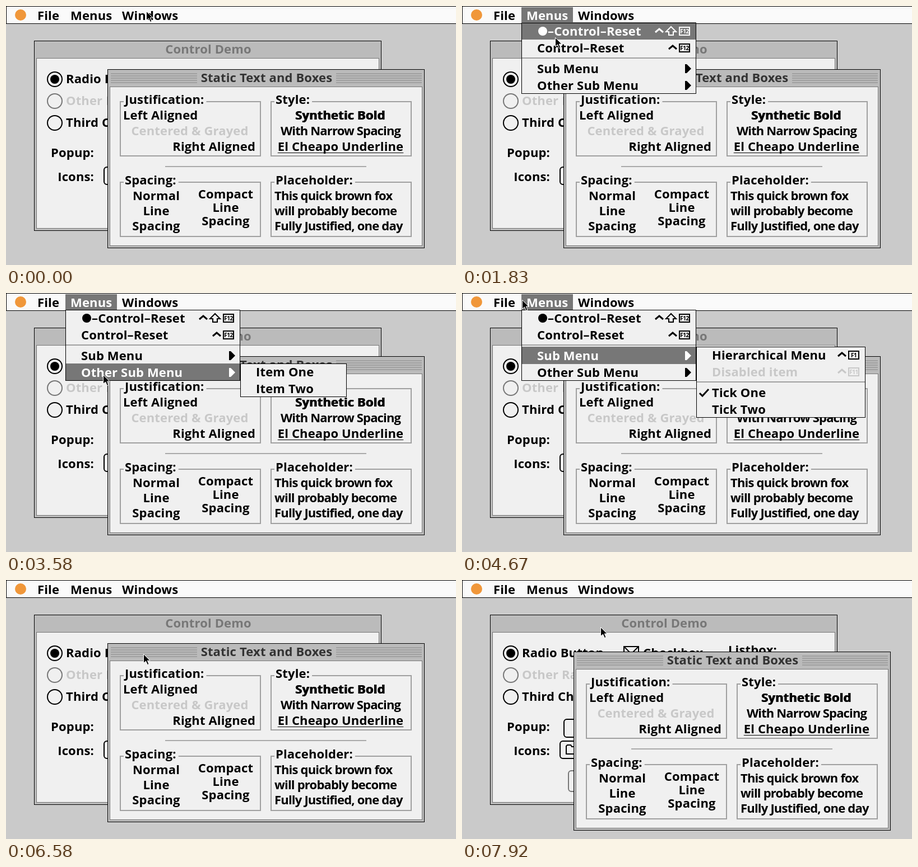
An HTML page with a canvas that plays this animation: 803x463 px, repeating every 8 s.

```html
<!DOCTYPE html>
<html lang="en">
<head>
<meta charset="utf-8">
<title>Desktop controls</title>
<style>
  html, body { margin: 0; width: 100%; height: 100%; overflow: hidden; background: #cacaca; }
  canvas { display: block; }
</style>
</head>
<body>
<canvas id="stage" width="803" height="463"></canvas>
<script>
const ctx = document.getElementById('stage').getContext('2d');
const LOOP = 8000, FPS = 12, ROW = 30, GAP = 7;
const INK = '#000', PAPER = '#f0f0f0', DIM = '#c8c8c8', ACCENT = '#777', EDGE = '#a0a0a0';

// ---- drawing helpers ----
function fill(x, y, w, h, color) {
  ctx.fillStyle = color;
  ctx.fillRect(x, y, w, h);
}

function outline(x, y, w, h, color) {
  ctx.strokeStyle = color;
  ctx.lineWidth = 1;
  ctx.strokeRect(x + 0.5, y + 0.5, w - 1, h - 1);
}

function frame(x, y, w, h, border, inside) {
  fill(x, y, w, h, inside);
  outline(x, y, w, h, border);
}

function setFont(size = 22, spacing = 0.15) {
  ctx.font = `700 ${size}px "Open Sans", "Noto Sans", sans-serif`;
  ctx.letterSpacing = spacing + 'px';
}

function text(str, x, cy, { color = INK, align = 'left', spacing, size = 22 } = {}) {
  setFont(size, spacing);
  ctx.textAlign = align;
  ctx.fillStyle = color;
  ctx.fillText(str, x, Math.round(cy + size * 0.36));
  return ctx.measureText(str).width;
}

function path(points, { stroke, fill: inside, width = 2, close = false }) {
  ctx.beginPath();
  for (const [x, y] of points) ctx.lineTo(x, y);
  if (close) ctx.closePath();
  if (inside) { ctx.fillStyle = inside; ctx.fill(); }
  if (stroke) { ctx.strokeStyle = stroke; ctx.lineWidth = width; ctx.stroke(); }
}

function disc(x, y, r, color) {
  ctx.beginPath();
  ctx.arc(x, y, r, 0, 7);
  ctx.fillStyle = color;
  ctx.fill();
}

function roundBox(x, y, w, h, color) {
  ctx.beginPath();
  ctx.roundRect(x, y, w, h, 5);
  ctx.strokeStyle = color;
  ctx.lineWidth = 2;
  ctx.stroke();
}

// ---- windows ----
function windowFrame(x, y, w, h, title, titleColor) {
  frame(x, y, w, h, INK, '#bbb');
  frame(x + 4, y + 31, w - 8, h - 35, '#777', PAPER);
  text(title, x + w / 2 + 1, y + 15, { color: titleColor, align: 'center' });
}

function radio(cy, label, color, ring, on) {
  disc(87, cy, 14, ring);
  disc(87, cy, 12, PAPER);
  if (on) disc(87, cy, 8, INK);
  text(label, 107, cy - 1, { color });
}

function controlWindow() {
  windowFrame(50, 62, 620, 340, 'Control Demo', '#777');
  radio(131, 'Radio Button', INK, INK, true);
  radio(170, 'Other Radio', DIM, '#777', false);
  radio(209, 'Third Choice', INK, INK, false);
  ctx.strokeStyle = INK;
  ctx.lineWidth = 2;
  ctx.strokeRect(289, 119, 26, 26);
  path([[289, 119], [315, 145]], { stroke: INK });
  path([[315, 119], [289, 145]], { stroke: INK });
  text('Checkbox', 323, 130);
  text('Listbox:', 475, 125);
  text('Popup:', 157, 262, { align: 'right' });
  text('Icons:', 157, 305, { align: 'right' });
  roundBox(182, 249, 120, 32, INK);
  roundBox(175, 288, 60, 31, INK);
  path([[186, 311], [186, 297], [188, 295], [194, 295], [196, 298], [208, 298], [208, 311]],
    { stroke: INK, close: true });
  roundBox(190, 341, 90, 37, '#777');
}

function group(x, y, label) {
  ctx.strokeStyle = EDGE;
  ctx.lineWidth = 2;
  ctx.strokeRect(x, y, 250, 97);
  setFont();
  fill(x + 6, y - 2, ctx.measureText(label).width + 6, 5, PAPER);
  text(label, x + 8, y - 4);
}

function lines(rows, x, cy, step, style) {
  rows.forEach((row, i) => text(row, x, cy + i * step, style));
}

function textWindow(dx, dy) {
  const middle = { align: 'center' };
  ctx.save();
  ctx.translate(dx, dy);
  windowFrame(181, 113, 566, 320, 'Static Text and Boxes', '#333');
  for (let y = 120; y < 140; y += 4) {
    fill(187, y, 154, 2, EDGE);
    fill(589, y, 153, 2, EDGE);
  }
  group(204, 171, 'Justification:');
  text('Left Aligned', 209, 195);
  text('Centered & Grayed', 328, 223, { color: DIM, align: 'center' });
  text('Right Aligned', 445, 251, { align: 'right' });

  group(473, 171, 'Style:');
  text('Synthetic Bold', 596, 195, middle);
  text('Synthetic Bold', 597, 195, middle);
  text('With Narrow Spacing', 597, 223, { align: 'center', spacing: -0.85 });
  const underline = text('El Cheapo Underline', 597, 251, middle);
  fill(597 - underline / 2, 262, underline, 1, INK);

  fill(284, 286, 359, 2, '#aaa');
  group(204, 315, 'Spacing:');
  lines(['Normal', 'Line', 'Spacing'], 268, 339, 27, middle);
  lines(['Compact', 'Line', 'Spacing'], 392, 336, 24, middle);
  group(473, 315, 'Placeholder:');
  lines(['This quick brown fox', 'will probably become', 'Fully Justified, one day'],
    479, 339, 27, { spacing: -0.8 });
  ctx.restore();
}

// ---- menus ----
const menus = {
  File: { x: 47, y: 30, w: 135, label: 56, rows: [{ name: 'Exit', key: 'F4' }] },
  Menus: {
    x: 106, y: 30, w: 312, label: 115, rows: [
      { name: '–Control–Reset', key: 'F12', shift: true, badge: true },
      { name: 'Control–Reset', key: 'F12', ruled: true },
      { name: 'Sub Menu', opens: 'sub' },
      { name: 'Other Sub Menu', opens: 'other' }]
  },
  Windows: {
    x: 198, y: 30, w: 273, label: 207, rows: [
      { name: 'Control Demo' }, { name: 'Static Text and Boxes' },
      { name: 'Window Types' }, { name: 'About' }]
  },
  sub: {
    x: 418, y: 96, w: 302, rows: [
      { name: 'Hierarchical Menu', key: 'F1' },
      { name: 'Disabled item', key: 'F11', off: true, ruled: true },
      { name: 'Tick One', ticked: true },
      { name: 'Tick Two' }]
  },
  other: { x: 418, y: 126, w: 190, rows: [{ name: 'Item One' }, { name: 'Item Two' }] }
};
const barEdges = { File: [47, 106], Menus: [106, 198], Windows: [198, 317] };

function shortcut(row, right, cy, color) {
  const left = right - 20, caret = left - (row.shift ? 35 : 11), s = left - 14;
  ctx.strokeStyle = color;
  ctx.lineWidth = 2;
  ctx.strokeRect(left + 1, cy - 7, 18, 14);
  text(row.key, left + 10, cy, { color, align: 'center', size: 10, spacing: -0.5 });
  path([[caret - 7, cy + 2], [caret, cy - 4], [caret + 7, cy + 2]], { stroke: color, width: 3 });
  if (row.shift) {
    path([[s, cy - 8], [s + 9, cy + 1], [s + 4, cy + 1], [s + 4, cy + 7],
      [s - 4, cy + 7], [s - 4, cy + 1], [s - 9, cy + 1]], { stroke: color, close: true });
  }
}

function panel({ x, y, w, rows }, active = -1) {
  const h = rows.length * ROW + (rows.some(r => r.ruled) ? GAP : 0);
  fill(x, y, w, h, PAPER);
  let top = y;
  rows.forEach((row, i) => {
    const cy = top + 15, lit = i === active;
    const color = lit ? '#fff' : row.off ? DIM : INK;
    if (lit) fill(x, top - 1, w, ROW + 1, ACCENT);
    if (row.badge) disc(x + 38, cy, 8, color);
    text(row.name, x + (row.badge ? 47 : 28), cy, { color });
    if (row.key) shortcut(row, x + w - 11, cy, color);
    if (row.opens) {
      const a = x + w - 20;
      path([[a, cy - 8], [a + 3, cy - 8], [a + 11, cy], [a + 3, cy + 8], [a, cy + 8]], { fill: color });
    }
    if (row.ticked) {
      path([[x + 6, cy + 1], [x + 11, cy + 6], [x + 22, cy - 6]], { stroke: color, width: 3 });
    }
    top += ROW;
    if (row.ruled) {
      fill(x + 1, top + 2, w - 2, 2, EDGE);
      top += GAP;
    }
  });
  outline(x, y, w, h, INK);
}

function menuBar(open) {
  frame(0, 0, 804, 32, INK, '#fafafa');
  disc(26, 16, 10, '#f0973a');
  for (const [name, [left, right]] of Object.entries(barEdges)) {
    if (name === open) fill(left, 2, right - left, 29, ACCENT);
    text(name, menus[name].label, 17, { color: name === open ? '#fff' : INK });
  }
}

// ---- timeline, in ticks of 1/12 s ----
const cursorKeys = [
  [0, 250, 9], [5, 250, 9], [6, 249, 9], [11, 249, 9], [18, 158, 14], [21, 164, 26],
  [22, 166, 56], [26, 169, 110], [28, 169, 110], [29, 169, 111], [32, 169, 111],
  [33, 170, 112], [40, 170, 112], [43, 173, 146], [48, 173, 146], [54, 96, 75],
  [55, 98, 40], [56, 107, 12], [57, 88, 10], [58, 77, 11], [59, 74, 13], [68, 74, 13],
  [78, 243, 132], [79, 245, 132], [83, 260, 142], [85, 263, 147], [88, 263, 147],
  [93, 248, 85], [94, 248, 85], [95, 247, 84]];
const dragKeys = [[79, 0, 0], [83, 15, 11], [85, 18, 15]];
const menuKeys = [
  [0], [8, 'Windows'], [15, 'Menus'], [22, 'Menus', 0], [23, 'Menus', 1], [25, 'Menus', 2],
  [42, 'Menus', 3], [51, 'Menus', 2], [57, 'File'], [64]];

function along(keys, tick) {
  const next = keys.findIndex(k => k[0] > tick);
  if (next === 0) return keys[0].slice(1);
  if (next < 0) return keys.at(-1).slice(1);
  const [t0, ...from] = keys[next - 1], [t1, ...to] = keys[next];
  const u = (tick - t0) / (t1 - t0), eased = u * u * (3 - 2 * u);
  return from.map((v, i) => Math.round(v + (to[i] - v) * eased));
}

function pointer(x, y) {
  const shape = [[0, 0], [0, 16], [4, 12.5], [7, 19], [9.5, 18], [6.8, 11.5], [11.5, 11.5]];
  path(shape.map(([px, py]) => [x + px + 0.5, y + py + 0.5]),
    { stroke: '#fff', fill: INK, width: 1, close: true });
}

function draw(ms) {
  const tick = Math.floor((ms % LOOP + 5) * FPS / 1000);
  const [, open, active] = menuKeys.findLast(k => k[0] <= tick);
  fill(0, 0, 803, 463, '#cacaca');
  controlWindow();
  textWindow(...along(dragKeys, tick));
  menuBar(open);
  if (open) {
    panel(menus[open], active);
    const child = menus[open].rows[active]?.opens;
    if (child) panel(menus[child]);
  }
  pointer(...along(cursorKeys, tick));
}

const start = performance.now();
function loop() {
  draw(performance.now() - start);
  requestAnimationFrame(loop);
}
loop();
</script>
</body>
</html>
```
